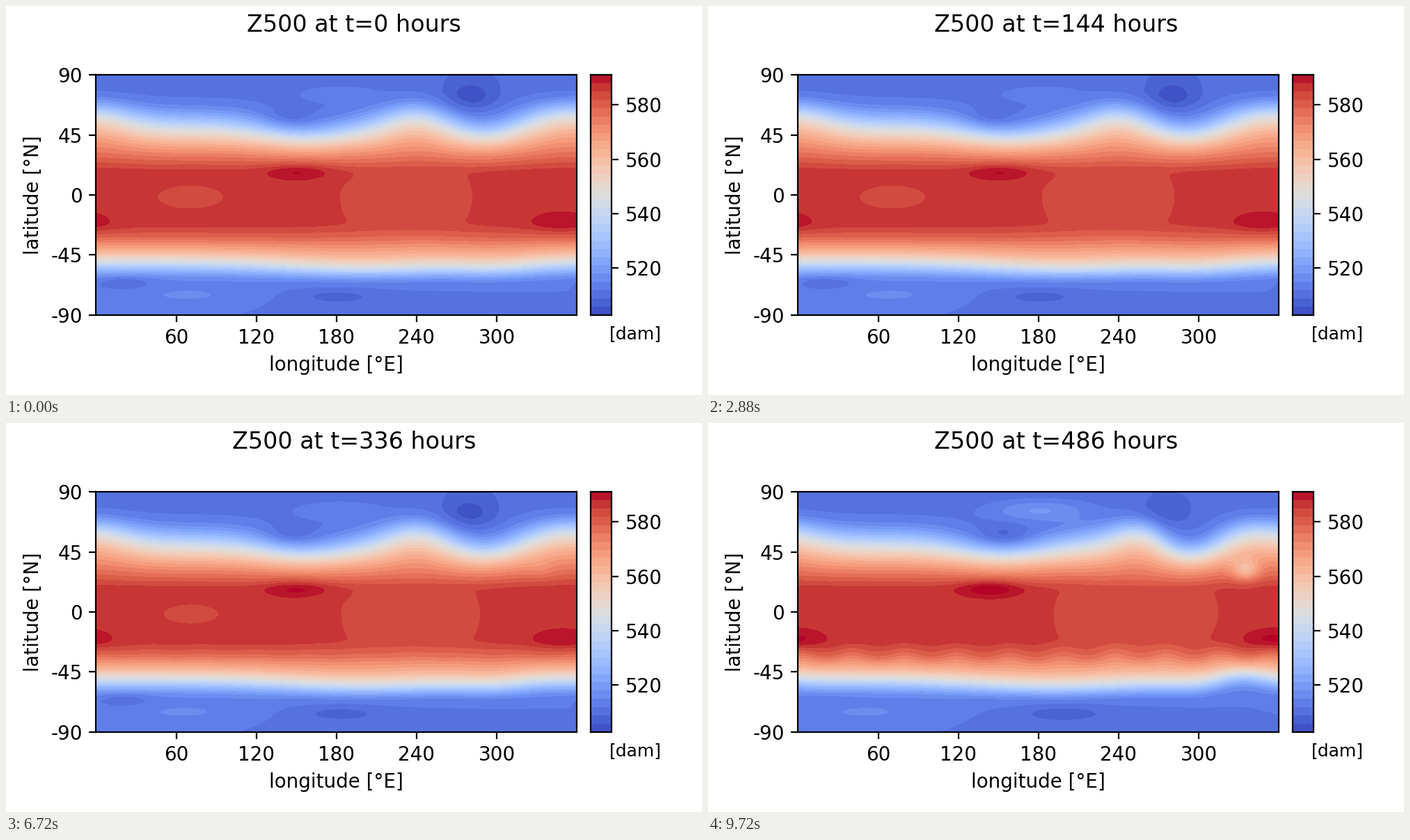
Write a matplotlib script that moves like this. It is 1000 px wide and 560 px high and loops after 9840 ms.

```python
import numpy as np
import matplotlib.pyplot as plt
from matplotlib.animation import FuncAnimation
from matplotlib.colors import ListedColormap

W, H, DPI = 1000, 560, 200
LEFT, TOP, WIDTH, HEIGHT = 129.4, 99.2, 690.8, 345.5
FRAMES, STEP_MS, STEP_HOURS = 82, 120, 6
LAST_HOUR = (FRAMES - 1) * STEP_HOURS
BANDS = 29
VMIN, VMAX = 502.8, 591.0

plt.rcParams["font.family"] = "DejaVu Sans"
cmap = plt.get_cmap("coolwarm")
shades = [cmap((i + 0.5) / BANDS) for i in range(BANDS)]
fills = [cmap(0.0), *shades, cmap(1.0)]

# Heights are in colour bands (0..29), positions in stage pixels.
xs = LEFT + np.linspace(0, WIDTH, 231)
ys = TOP + np.linspace(0, HEIGHT, 174)
X, Y = np.meshgrid(xs, ys)

# Zonal mean from pole to pole.
PROFILE = [(99, 2.2), (128, 2.7), (145, 4), (162, 8), (180, 14.5), (199, 20),
           (212, 23), (223, 25), (237, 27.4), (316, 27.4), (333, 25),
           (352, 20), (366, 14.5), (379, 8), (391, 4), (404, 3.3), (445, 2.6)]
fine = np.arange(60, 490)
kernel = np.exp(-0.5 * (np.arange(-10, 11) / 3.5) ** 2)
raw = np.pad(np.interp(fine, *zip(*PROFILE)), 10, mode="edge")
zonal = np.convolve(raw, kernel / kernel.sum(), mode="valid")


def mix(a, b, w):
    return a + (b - a) * w


def gap(x):
    """Signed distance to x around the globe."""
    return (X - x + WIDTH / 2) % WIDTH - WIDTH / 2


def bell(d, spread):
    return np.exp(-0.5 * (d / spread) ** 2)


# Meanders of the jets: x, drift, width, southward push at start and end
NORTH_WAVES = [
    (430, -5, 55, 20, 22),
    (587, 36, 36, -15, -19),
    (688, 2, 36, 14, 24),
    (812, -22, 48, -19, -17),
]
SOUTH_WAVES = [
    (520, -20, 110, 9, 9),
    (705, 10, 50, 5, 4),
    (765, 0, 32, 0, -12),
]

# Highs and lows: x, drift, y, x spread, y spread, strength at start and end
CENTRES = {
    "polar low": (667, -12, 130, 27, 17, -2.2, -1.3),
    "polar ridge": (475, 0, 126, 50, 11, 0.9, 2.6),
    "trough pocket": (405, 20, 163, 25, 11, -1.2, -1.6),
    "northern high": (420, -14, 238, 32, 9, 1.9, 2.6),
    "southern high": (797, 16, 311, 32, 11, 1.5, 1.9),
    "ocean tropics": (575, 40, 275, 75, 60, -0.9, -1.4),
    "land tropics": (265, 5, 275, 45, 16, -0.7, 0),
    "late cyclone": (768, 5, 212, 14, 11, 0, -5),
    "coastal low": (170, 0, 398, 28, 7, -1.6, -0.3),
    "ice ridge": (260, -35, 417, 60, 9, 0.8, 0.8),
    "ice low": (475, 35, 417, 42, 8, -1.2, -1.5),
}


def push(waves, w, y, spread):
    total = sum(mix(a0, a1, w) * bell(gap(x + drift * w ** 2), width)
                for x, drift, width, a0, a1 in waves)
    return total * bell(Y - y, spread)


def field(hours):
    w = (hours / LAST_HOUR) ** 5  # nearly still, then breaks up quickly
    shift = push(NORTH_WAVES, w, 162, 34) + push(SOUTH_WAVES, w, 374, 24)
    shift += 3 * w * np.sin(X / 12) * bell(Y - 330, 12)
    z = np.interp(Y - shift, fine, zonal)
    z -= 0.4 * np.tanh((X - 380) / 30) * (Y > 380) * (Y - 380) / 64
    for x, drift, y, sx, sy, a0, a1 in CENTRES.values():
        z += mix(a0, a1, w) * bell(gap(x + drift * w), sx) * bell(Y - y, sy)
    return z


fig = plt.figure(figsize=(W / DPI, H / DPI), dpi=DPI, facecolor="white")


def axes_at(x, width):
    return fig.add_axes([x / W, 1 - (TOP + HEIGHT) / H, width / W, HEIGHT / H])


ax = axes_at(LEFT, WIDTH)
ax.set(xlim=(0, 360), ylim=(-90, 90),
       xlabel="longitude [°E]", ylabel="latitude [°N]")
ax.set_xticks(range(60, 301, 60))
lats = range(-90, 91, 45)
ax.set_yticks(lats, [str(v) for v in lats])

bar = axes_at(840, 30)
bar.imshow(np.arange(BANDS)[:, None], cmap=ListedColormap(shades), aspect="auto",
           origin="lower", extent=(0, 1, VMIN, VMAX), interpolation="nearest")
bar.set_xticks([])
bar.yaxis.tick_right()
bar.set_yticks(range(520, 581, 20))
fig.text(0.9045, 1 - 472 / H, "[dam]", fontsize=9, ha="center", va="center")
title = fig.suptitle("")

lon = np.linspace(0, 360, len(xs))
lat = np.linspace(90, -90, len(ys))


def draw(i):
    hours = i * STEP_HOURS
    for old in list(ax.collections):
        old.remove()
    ax.contourf(lon, lat, field(hours), levels=np.arange(BANDS + 1),
                colors=fills, extend="both")
    title.set_text(f"Z500 at t={hours} hours")
    return []


anim = FuncAnimation(fig, draw, frames=FRAMES, interval=STEP_MS,
                     repeat=True, repeat_delay=0, blit=False)
plt.show()
```
